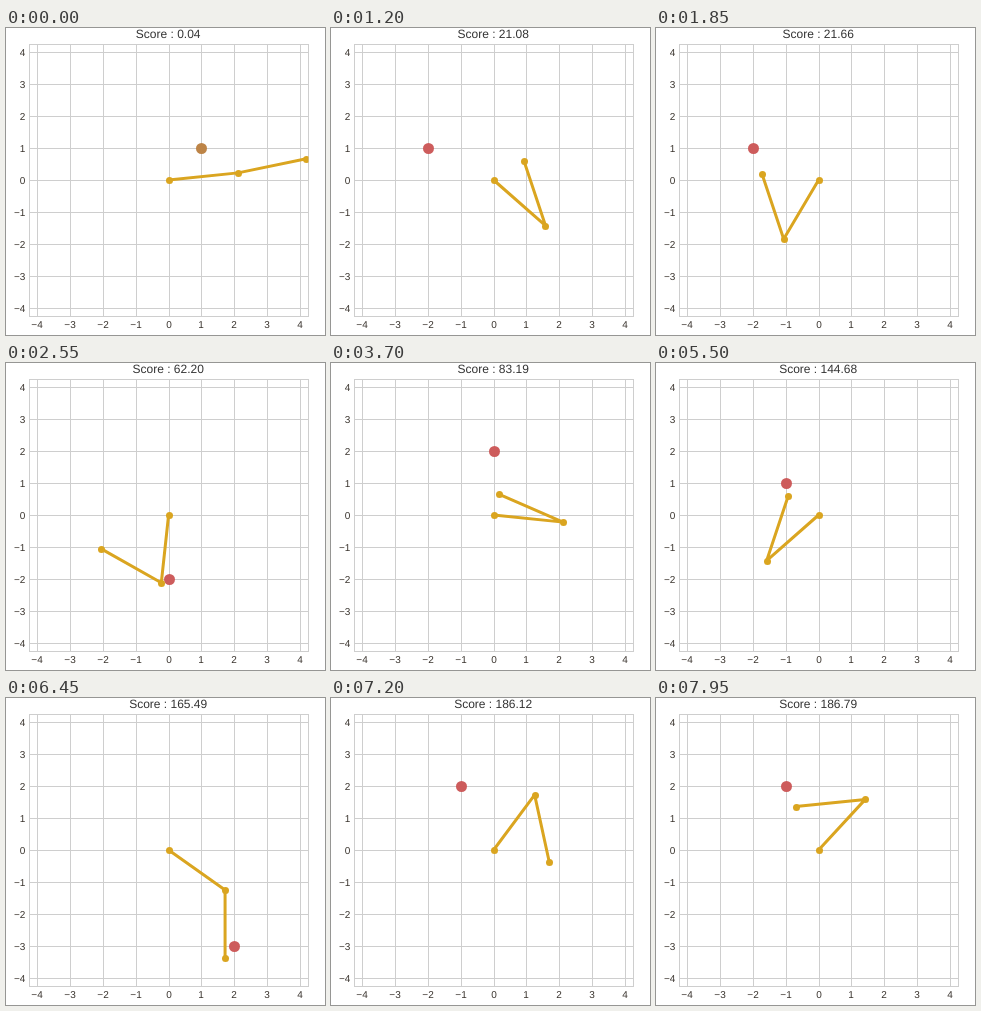
Animation of 319x307 px, one loop 8 s. Source, as an HTML page:

```html
<!DOCTYPE html>
<html lang="en">
<head>
<meta charset="utf-8">
<title>Two-link arm</title>
<style>
  html, body { margin: 0; width: 100%; height: 100%; overflow: hidden; background: #fff; }
  svg { display: block; width: 319px; height: 307px; }
  text {
    font: 10px "Liberation Sans", Arial, sans-serif;
    fill: #3a342e;
    text-anchor: middle;
    text-rendering: geometricPrecision;
  }
  #score { font-size: 12px; fill: #333; }
  .grid { stroke: #cecece; fill: none; }
  #arm { fill: #daa520; }
  #links { fill: none; stroke: #daa520; stroke-width: 3; stroke-linecap: round; stroke-linejoin: round; }
</style>
</head>
<body>
<svg viewBox="0 0 319 307">
  <clipPath id="plot"><rect x="23" y="16" width="279.5" height="273"/></clipPath>
  <g id="axes"></g>
  <rect class="grid" x="23.5" y="16.5" width="279" height="272"/>
  <text id="score" x="162.2" y="10"></text>
  <g clip-path="url(#plot)">
    <circle id="goal" r="5.5"/>
    <g id="arm">
      <path id="links"/>
      <circle r="3.5"/><circle r="3.5"/><circle r="3.5"/>
    </g>
  </g>
</svg>
<script>
const STEP_MS = 50, STEPS = 160;
const NOTCH = Math.PI / 30;   // a joint turns at most one notch per step
const LINK = 2.125;
const GOAL_POINTS = 20, STEP_POINTS = .045;

// Each goal with the joint notches (shoulder, elbow) that reach it
const START = { pose: [1, 1] };
const legs = [
  { goal: [1, 1], pose: [-4, 22] },
  { goal: [-2, 1], pose: [-23, 41] },
  { goal: [-3, 1], pose: [-25, 41] },
  { goal: [0, -2], pose: [-7, 41] },
  { goal: [0, 2], pose: [4, 22] },
  { goal: [2, 2], pose: [1, 15] },
  { goal: [-1, 1], pose: [-24, 36] },
  { goal: [2, -3], pose: [-5, 52] },
  { goal: [2, 0], pose: [9, 38] },
  { goal: [-1, 2], pose: [5, 20] }
];

// A leg lasts as long as its busiest joint needs
let clock = 0;
legs.forEach((leg, i) => {
  leg.from = (legs[i - 1] || START).pose;
  clock += Math.max(...leg.pose.map((to, j) => Math.abs(to - leg.from[j])));
  leg.end = clock;
});

// The other joint waits, then arrives at the same moment
function jointAt(from, to, stepsLeft) {
  return to + Math.sign(from - to) * Math.min(Math.abs(from - to), stepsLeft);
}

const px = x => 162.6 + 32.85 * x;
const py = y => 152 - 32.05 * y;
const snap = v => Math.round(v) + .5;
const byId = id => document.getElementById(id);

function drawAxes() {
  let out = "";
  for (let n = -4; n <= 4; n++) {
    const x = snap(px(n)), y = snap(py(n));
    const label = n < 0 ? "\u2212" + -n : n;
    out += `<path class="grid" d="M${x} 16V289M23 ${y}H302"/>
      <text x="${x - .5}" y="299.5">${label}</text>
      <text x="19.3" y="${y + 3.5}" style="text-anchor:end">${label}</text>`;
  }
  byId("axes").innerHTML = out;
}

const goalDot = byId("goal"), links = byId("links"), score = byId("score");
const joints = document.querySelectorAll("#arm circle");

function place(dot, [x, y]) {
  dot.setAttribute("cx", snap(px(x)));
  dot.setAttribute("cy", snap(py(y)));
}

function extend([x, y], angle) {
  return [x + LINK * Math.cos(angle), y + LINK * Math.sin(angle)];
}

function draw(step) {
  const leg = legs.find(l => step < l.end);
  const [shoulder, bend] = leg.pose.map((to, j) => NOTCH * jointAt(leg.from[j], to, leg.end - step));
  const base = [0, 0];
  const elbow = extend(base, shoulder);
  const hand = extend(elbow, shoulder + bend);
  const points = [base, elbow, hand];
  points.forEach((p, i) => place(joints[i], p));
  links.setAttribute("d", "M" + points.map(([x, y]) => `${px(x)} ${py(y)}`).join("L"));

  place(goalDot, leg.goal);
  goalDot.setAttribute("fill", leg === legs[0] ? "#bd8447" : "#cd5c5c");

  // the goal counts on the last step of its leg
  const reached = legs.filter(l => step >= l.end - 1).length;
  const points_ = reached * GOAL_POINTS + (step + 1 - reached) * STEP_POINTS;
  score.textContent = "Score : " + points_.toFixed(2);
}

let shown = -1;
function tick() {
  const step = Math.floor(performance.now() / STEP_MS) % STEPS;
  if (step !== shown) draw(shown = step);
  requestAnimationFrame(tick);
}

drawAxes();
tick();
</script>
</body>
</html>
```
